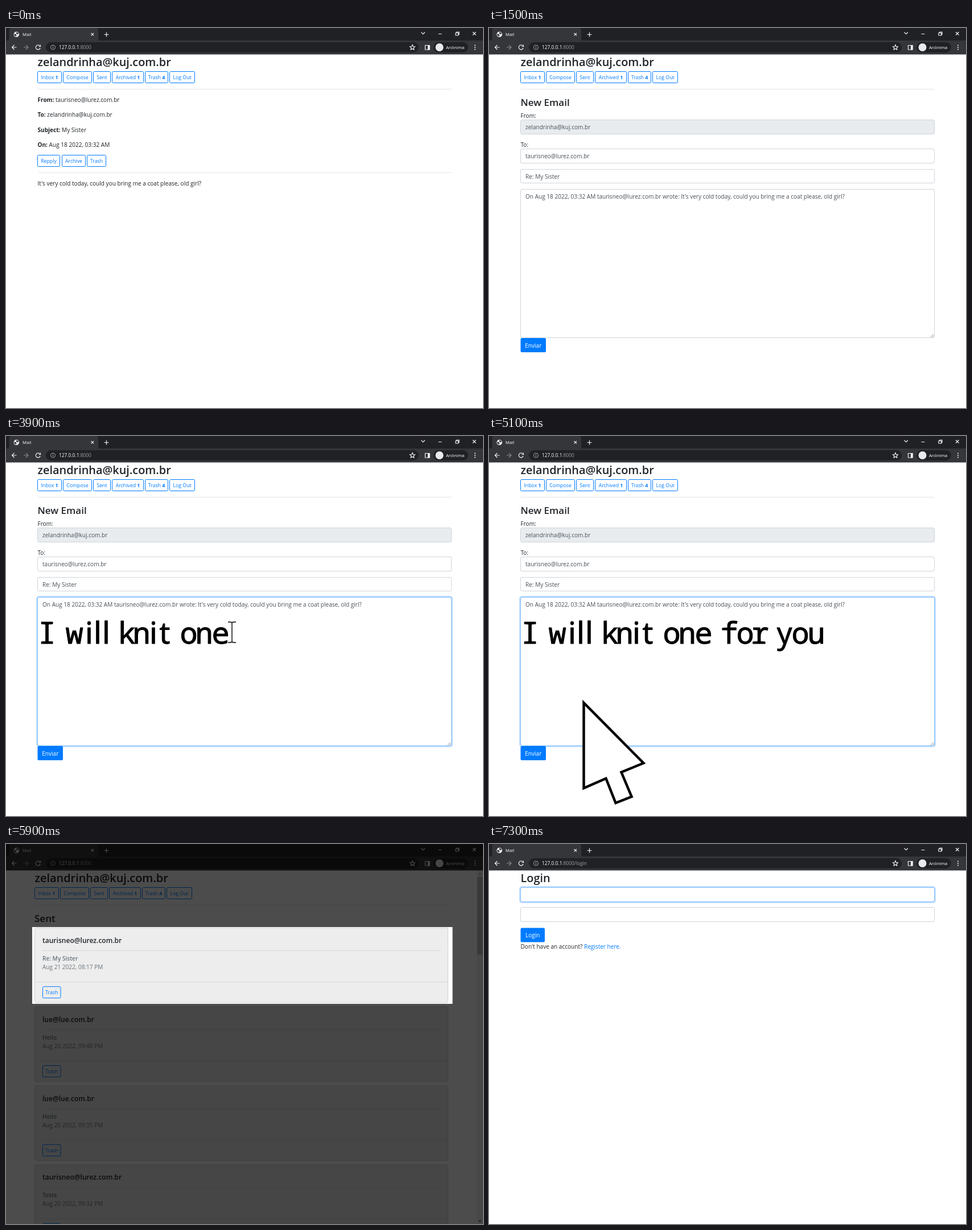
These frames come from a looping animation (838 px wide and 668 px high, 8 s). An HTML page:

```html
<!DOCTYPE html>
<html lang="en">
<head>
<meta charset="utf-8">
<title>Mail</title>
<style>
html, body { margin: 0; width: 100%; height: 100%; overflow: hidden; background: #fff; }
svg { display: block; width: 838px; height: 668px; font: 10.07px "Open Sans", "Noto Sans", sans-serif; fill: #212529; }
.h2 { font-size: 19.9px; font-weight: 600; }
.h3 { font-size: 17px; font-weight: 600; }
.h5 { font-size: 12.05px; font-weight: 600; }
.b { font-weight: 700; }
.semi { font-weight: 600; }
.grey { fill: #6c757d; }
.value { fill: #495057; }
.link { fill: #007bff; }
.white { fill: #fff; }
.line { fill: none; stroke: #000; stroke-opacity: .1; }
.box { fill: #fff; stroke: #ced4da; }
.box.off { fill: #e9ecef; }
.btn { font-size: 8.78px; text-anchor: middle; fill: #007bff; }
.btn rect { fill: none; stroke: #007bff; }
.btn.on { fill: #fff; }
.btn.on rect { fill: #007bff; }
.main { text-anchor: middle; fill: #fff; }
.main rect { fill: #007bff; }
.main.on rect { fill: #0069d9; }
.focus rect { fill: none; stroke: #80bdff; }
.focus .ring { stroke: #007bff; stroke-opacity: .25; stroke-width: 2; }
.ui { font-size: 7.7px; font-weight: 500; fill: #fff; }
.icon { fill: none; stroke: #f1f3f4; stroke-width: 1.2; }
.pointer { fill: #fff; stroke: #000; stroke-width: 4.5; }
.note { font: 500 52px "Noto Sans Mono", monospace; text-anchor: middle; fill: #000; stroke: #000; stroke-width: 1; stroke-linejoin: round; }
.note .thin { font-family: "Noto Sans", sans-serif; }
</style>
</head>
<body>
<svg id="stage" viewBox="0 0 838 668"></svg>
<script>
const ME = 'zelandrinha@kuj.com.br', FRIEND = 'taurisneo@lurez.com.br', OTHER = 'lue@lue.com.br';
const BODY = "It's very cold today, could you bring me a coat please, old girl?";

const text = (x, y, s, cls = '') => `<text x="${x}" y="${y}" class="${cls}">${s}</text>`;
const bold = s => `<tspan class="b">${s}</tspan>`;
const rect = (x, y, w, h, attrs = '') => `<rect x="${x}" y="${y}" width="${w}" height="${h}" ${attrs}/>`;
const path = (d, cls) => `<path d="${d}" class="${cls}"/>`;
const group = (id, s, attrs = '') => `<g id="${id}" ${attrs}>${s}</g>`;
const rule = (x, y, w) => path(`M${x} ${y}h${w}`, 'line');
const field = (y, h, cls = '') => rect(55.5, y, 727, h, `rx="2.6" class="box ${cls}"`);
const focus = (id, y, h) => group(id, rect(54, y - 1.5, 730, h + 3, 'rx="4" class="ring"') +
  rect(55.5, y, 727, h, 'rx="2.6"'), 'class="focus"');
const button = (id, x, y, w, s) => group(id, rect(x, y, w, 20, 'rx="2"') + text(x + w / 2, y + 13.7, s), 'class="btn"');
const mainButton = (id, y, w, s) => group(id, rect(55.5, y, w, 25, 'rx="2.6"') + text(55.5 + w / 2, y + 16.5, s), 'class="main"');

const browser = rect(0, 0, 838, 22, 'fill="#202124"') +
  '<path d="M2 22q3.5 0 3.5-4V4q0-4 4-4H158q4 0 4 4V18q0 4 4 4Z" fill="#35363a"/>' +
  rect(0, 22, 838, 24.5, 'fill="#35363a"') +
  rect(70, 25, 655, 18, 'rx="9" fill="#202124"') + rect(751, 25, 61, 18, 'rx="9" fill="#202124"') +
  '<circle cx="18.3" cy="11.3" r="4.8" fill="#f1f3f4"/>' +
  '<path d="M14.5 10l3 1 1 2-1 2-3-2ZM18 7.5l3 .5 1 2.5-2 .5-2-1Z" fill="#35363a"/>' +
  text(29, 14, 'Mail', 'ui') +
  path('M149.5 8.8l4.6 4.6m0-4.6l-4.6 4.6M172.5 11.5h8m-4-4v8', 'icon') +
  path('M729.5 7.5l3.2 3.2 3.2-3.2M759.5 10.5h6M790 8.5h4.5v4.5h-4.5ZM791.5 8.3V7h4.5v4.5h-1.3M820 7l5.5 5.5m0-5.5l-5.5 5.5', 'icon') +
  path('M18.5 34h-8m4-4l-4 4 4 4', 'icon') +
  '<path d="M31 34h8m-4-4l4 4-4 4" fill="none" stroke="#85878a" stroke-width="1.2"/>' +
  path('M59.5 31.5a4 4 0 1 0 .7 3.5M60.5 29.5v3h-3', 'icon') +
  '<g fill="none" stroke="#9aa0a6"><circle cx="82.5" cy="34" r="4"/><path d="M82.5 33.3v3M82.5 31.3v1"/></g>' +
  `<text x="93" y="37" class="white" font-size="8.4">127.0.0.1<tspan fill="#9aa0a6">:8000<tspan id="route"></tspan></tspan></text>` +
  path('M714 29.5l1.3 3 3.2.3-2.4 2.1.7 3.2-2.8-1.7-2.8 1.7.7-3.2-2.4-2.1 3.2-.3Z', 'icon') +
  path('M736.5 30.5h7.5v7.5h-7.5Z', 'icon') + rect(741, 30, 3.5, 8.5, 'fill="#f1f3f4"') +
  '<circle cx="761.5" cy="34" r="7" fill="#e8eaed"/>' + text(773, 36.8, 'Anônima', 'ui') +
  [30.5, 34, 37.5].map(y => `<circle cx="824" cy="${y}" r="1" fill="#f1f3f4"/>`).join('');

const header = text(55.5, 67, ME, 'h2') +
  button('', 55.5, 76.5, 42, 'Inbox ' + bold(1)) + button('', 100.5, 76.5, 50, 'Compose') +
  button('', 153.5, 76.5, 30, 'Sent') + button('', 186.5, 76.5, 55, 'Archived ' + bold(1)) +
  button('', 244.5, 76.5, 40, 'Trash ' + bold(4)) + button('logout', 287.5, 76.5, 44, 'Log Out') +
  rule(55.5, 107.5, 727);

const mail = [['From:', FRIEND], ['To:', ME], ['Subject:', 'My Sister'], ['On:', 'Aug 18 2022, 03:32 AM']]
    .map(([k, v], i) => text(55.5, 130.3 + 26.15 * i, bold(k) + ' ' + v)).join('') +
  button('reply', 55.5, 223.5, 39, 'Repply') + button('', 98.5, 223.5, 41, 'Archive') +
  button('', 142.5, 223.5, 33, 'Trash') + rule(55.5, 254, 727) + text(55.5, 277, BODY);

// Handwritten reply: letters and the centre of each one
const LETTERS = 'Iwillknitoneforyou';
const CENTRES = [72, 120, 146, 161, 176, 212, 238, 259, 279, 321, 348, 377, 422, 450, 476, 519, 547, 575];
const isThin = c => 'ilt'.includes(c);
const note = [...LETTERS].map((c, i) => text(CENTRES[i], 365, c, isThin(c) ? 'thin' : '')).join('');

const compose = text(55.5, 136.5, 'New Email', 'h3') +
  text(55.5, 157.5, 'From:') + field(161.5, 25, 'off') + text(64, 178, ME, 'value') +
  text(55.5, 208.5, 'To:') + field(212.5, 25) + text(64, 229, FRIEND, 'value') +
  field(248.5, 24) + text(64, 264.5, 'Re: My Sister', 'value') +
  field(283.5, 261) + text(64, 300, `On Aug 18 2022, 03:32 AM ${FRIEND} wrote: ${BODY}`, 'value') +
  '<path d="M776 543.5l5-5M779 543.5l2-2" stroke="#666" stroke-width=".8"/>' +
  focus('areaFocus', 283.5, 261) + mainButton('send', 545, 44.5, 'Enviar') +
  group('note', note, 'class="note"');

const card = ([to, subject, date], i) => `<g transform="translate(0 ${138.8 * i})">` +
  rect(50.5, 147.5, 726, 131.5, 'rx="2.6" fill="#ededed" stroke="#d2d2d2"') +
  text(64, 174, to, 'h5') + rule(64, 187.5, 700) +
  text(64, 205, subject, 'grey semi') + text(64, 220, date, 'grey') +
  rule(51, 242.5, 726) + button('', 64.5, 250.7, 31.5, 'Trash') + '</g>';

const sent = text(50, 136.5, 'Sent', 'h3') + [
    [FRIEND, 'Re: My Sister', 'Aug 21 2022, 08:17 PM'],
    [OTHER, 'Hello', 'Aug 20 2022, 09:48 PM'],
    [OTHER, 'Hello', 'Aug 20 2022, 09:35 PM'],
    [FRIEND, 'Teste', 'Aug 20 2022, 09:32 PM']
  ].map(card).join('') +
  rect(827, 46.5, 11, 622, 'fill="#f1f1f1"') + rect(828, 57.5, 9, 137, 'fill="#c1c1c1"') +
  '<path d="M830 53.5l2.5-3 2.5 3Z" fill="#a3a3a3"/><path d="M830 661.5l2.5 3 2.5-3Z" fill="#505050"/>';

const login = text(55.5, 67, 'Login', 'h2') + field(76.5, 25) + focus('', 76.5, 25) + field(111.5, 25) +
  mainButton('', 147.5, 42.5, 'Login') +
  text(55.5, 184, `Don't have an account? <tspan class="link">Register here.</tspan>`);

const ARROW = 'M0 0L105 106 66 122 84 165 56 176 39 133 0 150Z';
const HAND = 'M-9 62V9a9 9 0 0 1 18 0V40a8.5 8.5 0 0 1 15 4a8 8 0 0 1 14 5a7.5 7.5 0 0 1 12 6V80L40 104H-6L-32 68a8 8 0 0 1 12-10ZM9 40V58M24 44V60M38 49V62';
const BEAM = 'M-7-18h4q3 0 3 2V16q0 2-3 2h-4M7-18h-4q-3 0-3 2M0 16q0 2 3 2h4';

document.getElementById('stage').innerHTML = group('header', header) + group('mail', mail) +
  group('compose', compose) + group('sent', sent) + group('login', login) + browser +
  group('shade', '<path d="M0 0H838V668H0ZM46 146V281H784.5V146Z" fill-opacity=".7" fill-rule="evenodd" fill="#000"/>') +
  group('beam', `<path d="${BEAM}" fill="none" stroke="#000" stroke-width="1.4"/>`) +
  '<path id="pointer" class="pointer"/>';

const el = id => document.getElementById(id);
const show = (id, on) => { el(id).style.display = on ? '' : 'none'; };
const clamp = (v, a, b) => Math.min(b, Math.max(a, v));
const glyphs = [...el('note').children];

// Each click: the arrow nears the button in steps and becomes a hand on it
const CLICKS = [
  { id: 'reply', at: 1000, end: 1500, steps: 4, from: [368, 248], to: [76, 231] },
  { id: 'send', at: 5000, end: 5400, steps: 3, from: [250, 380], to: [83, 558] },
  { id: 'logout', at: 6900, end: 7300, steps: 3, from: [223, 128], to: [310, 87] }
];

function movePointer(t) {
  show('pointer', false);
  for (const c of CLICKS) {
    const active = t >= c.at && t < c.end;
    const p = clamp(Math.floor((t - c.at) / 100) / (c.steps - 1), 0, 1);
    el(c.id).classList.toggle('on', active && p === 1);
    if (!active) continue;
    const [x, y] = c.from.map((v, i) => v + (c.to[i] - v) * p);
    show('pointer', true);
    el('pointer').setAttribute('d', p === 1 ? HAND : ARROW);
    el('pointer').setAttribute('transform', `translate(${x} ${y})`);
  }
}

function typeNote(t) {
  const count = clamp(Math.floor((t - 2700) / 100), 0, LETTERS.length);
  glyphs.forEach((g, i) => { g.style.display = i < count ? '' : 'none'; });
  show('areaFocus', t >= 2500);
  show('beam', t >= 2500 && t < 5000);
  const last = count - 1;
  const x = count ? CENTRES[last] + (isThin(LETTERS[last]) ? 12 : 20) : 58;
  const scale = 1 + 2.4 * (2 - clamp(Math.floor((t - 2500) / 100), 0, 2));
  el('beam').setAttribute('transform', `translate(${x} 345) scale(${scale})`);
}

function draw() {
  const t = performance.now() % 8000;
  const page = t < 1500 ? 'mail' : t < 5400 ? 'compose' : t < 7300 ? 'sent' : 'login';
  for (const id of ['mail', 'compose', 'sent', 'login']) show(id, id === page);
  show('header', page !== 'login');
  el('header').setAttribute('transform', `translate(${page === 'sent' ? -5 : 0} 0)`);
  el('route').textContent = page === 'login' ? '/login' : '';
  show('shade', t >= 5900 && t < 6900);
  movePointer(t);
  typeNote(t);
  requestAnimationFrame(draw);
}
draw();
</script>
</body>
</html>
```
